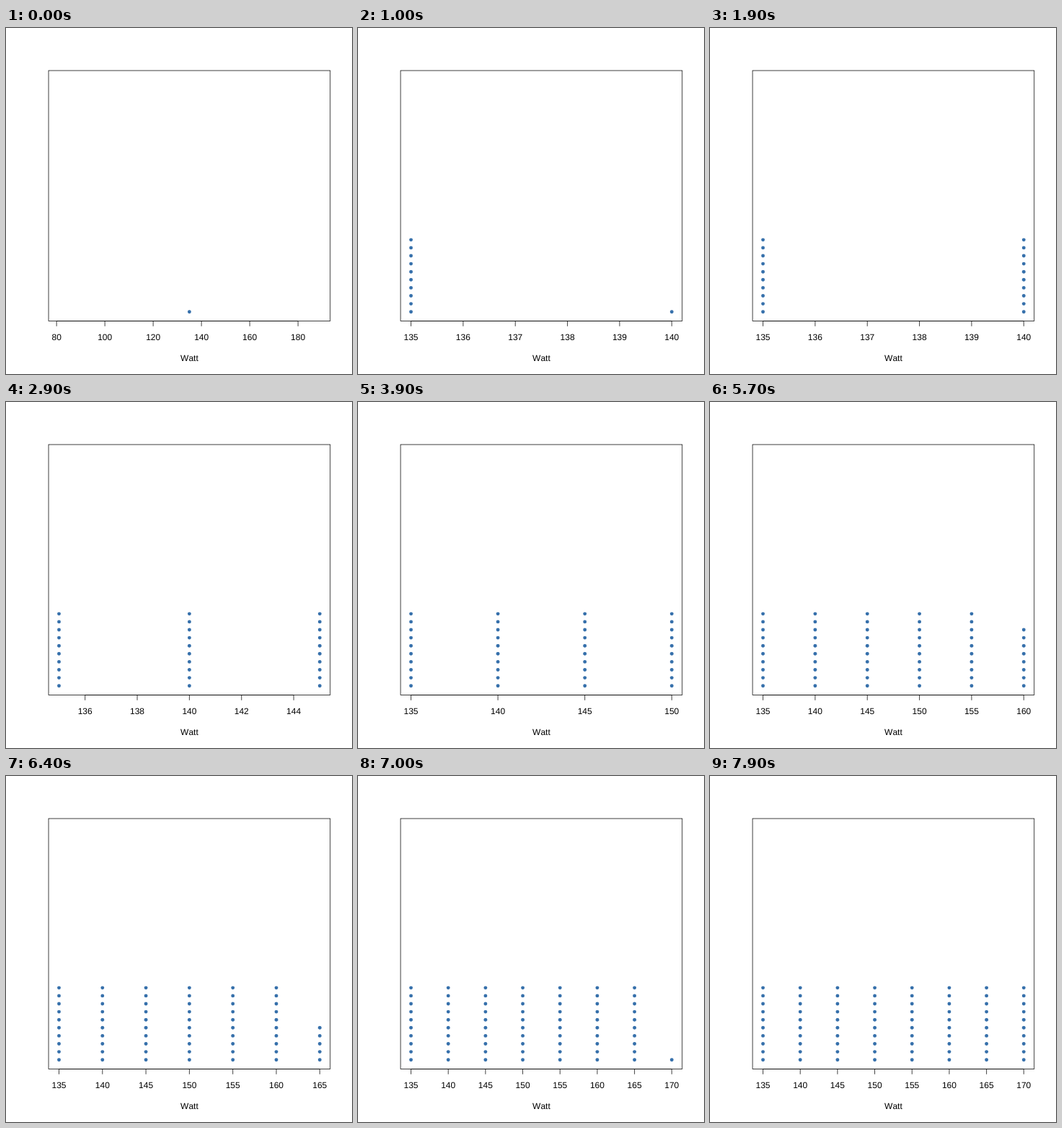
Write an HTML page that moves like this. It is 480x480 px and loops after 8 s.

```html
<!DOCTYPE html>
<html lang="en">
<head>
<meta charset="utf-8">
<title>Growing dot plot</title>
<style>
  html, body { margin: 0; width: 100%; height: 100%; overflow: hidden; background: #fff; }
  svg { display: block; width: 480px; height: 480px; }
  text {
    font: 12px "Liberation Sans", Arial, sans-serif;
    font-kerning: none;
    text-anchor: middle;
    text-rendering: geometricPrecision;
  }
  .lines { fill: none; stroke: #000; stroke-width: 0.75; }
  #dots { fill: #3670ab; }
</style>
</head>
<body>
<svg viewBox="0 0 480 480">
  <g id="dots"></g>
  <rect class="lines" x="59.04" y="59.04" width="390.72" height="347.52"/>
  <path id="axis" class="lines"/>
  <g id="labels"></g>
  <text x="254.4" y="462">Watt</text>
</svg>
<script>
  const LOOP = 8000, STEP = 100, PER_COLUMN = 10;
  const LEFT = 59.04, WIDTH = 390.72, BOTTOM = 406.56, HEIGHT = 347.52;
  const PAD = 0.04 / 1.08;               // axis margin as a share of the panel
  const FIRST = 135, GAP = 5, MAX_COUNT = 30;
  const RADIUS = 2.45, TICK = 7.2;
  const AXES = [[80, 20], [135, 1], [136, 2]];  // first tick and tick spacing
  const get = id => document.getElementById(id);

  const yOf = count =>
    BOTTOM - HEIGHT * (PAD + (1 - 2 * PAD) * (count - 1) / (MAX_COUNT - 1));

  function draw(total) {
    const last = Math.floor((total - 1) / PER_COLUMN);
    const min = last ? FIRST : FIRST * 0.6;
    const max = last ? FIRST + GAP * last : FIRST * 1.4;
    const xOf = v => LEFT + WIDTH * (PAD + (1 - 2 * PAD) * (v - min) / (max - min));

    let dots = "";
    for (let i = 0; i < total; i++) {
      const x = xOf(FIRST + GAP * Math.floor(i / PER_COLUMN));
      const y = yOf(i % PER_COLUMN + 1);
      dots += `<circle cx="${x.toFixed(2)}" cy="${y.toFixed(2)}" r="${RADIUS}"/>`;
    }

    const [start, spacing] = AXES[last] || [FIRST, GAP];
    const end = start + spacing * Math.floor((max - start) / spacing);
    let axis = `M${xOf(start)} ${BOTTOM}H${xOf(end)}`, labels = "";
    for (let v = start; v <= end; v += spacing) {
      const x = xOf(v).toFixed(2);
      axis += `M${x} ${BOTTOM}v${TICK}`;
      labels += `<text x="${x}" y="433">${v}</text>`;
    }

    get("dots").innerHTML = dots;
    get("axis").setAttribute("d", axis);
    get("labels").innerHTML = labels;
  }

  let shown = 0;
  const began = performance.now();

  function tick() {
    const time = Math.max(0, performance.now() - began) % LOOP;
    const total = Math.floor(time / STEP) + 1;
    if (total !== shown) draw(shown = total);
    requestAnimationFrame(tick);
  }
  tick();
</script>
</body>
</html>
```
